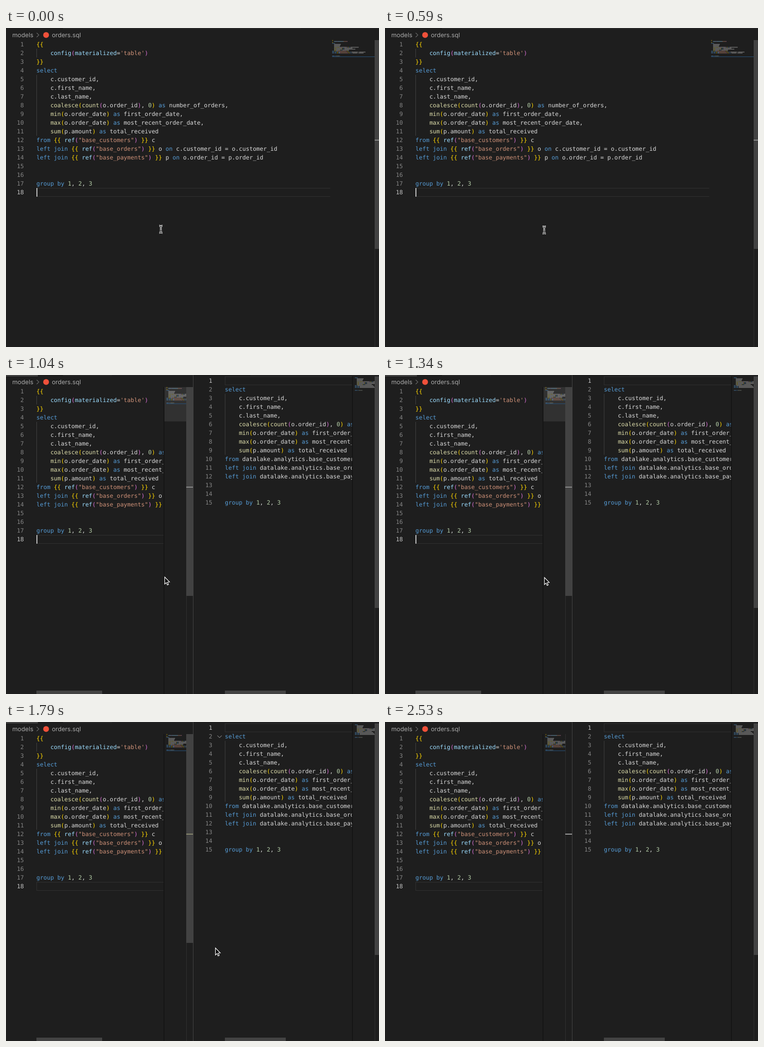
Animation of 772x660 px, one loop 2850 ms. Source, as an HTML page with a canvas:

```html
<!DOCTYPE html>
<html lang="en">
<head>
<meta charset="utf-8">
<title>SQL editor preview</title>
<style>
  html, body { margin: 0; width: 100%; height: 100%; overflow: hidden; background: #1e1e1e; }
  canvas { display: block; }
</style>
</head>
<body>
<canvas id="stage" width="772" height="660"></canvas>
<script>
const ctx = document.getElementById('stage').getContext('2d');
const LOOP = 2850, LINE = 18, CHAR = 7.224;
const MONO = '12px "DejaVu Sans Mono", monospace';
const SANS = '12.7px Inter, sans-serif';
const TEXT = '#dadada', GOLD = '#ffd700', ORCHID = '#da70d6';

const columns = `    c.customer_id,
    c.first_name,
    c.last_name,
    coalesce(count(o.order_id), 0) as number_of_orders,
    min(o.order_date) as first_order_date,
    max(o.order_date) as most_recent_order_date,
    sum(p.amount) as total_received`;

const modelSql = `{{
    config(materialized='table')
}}
select
${columns}
from {{ ref("base_customers") }} c
left join {{ ref("base_orders") }} o on c.customer_id = o.customer_id
left join {{ ref("base_payments") }} p on o.order_id = p.order_id


group by 1, 2, 3
`;

const compiledSql = `
select
${columns}
from datalake.analytics.base_customers
left join datalake.analytics.base_orders o on c.customer_id = o.customer_id
left join datalake.analytics.base_payments p on o.order_id = p.order_id


group by 1, 2, 3`;

const RULES = [
  [/^('[^']*'|"[^"]*")/, '#ce9178'],
  [/^(select|as|from|left join|on|group by)\b/, '#569cd6'],
  [/^(coalesce|count|min|max|sum)(?=\()/, '#dcdcaa'],
  [/^(config|ref|materialized)\b/, '#9cdcfe'],
  [/^\d+/, '#b5cea8'],
  [/^(\{\{|\()/, 'open'],
  [/^(\}\}|\))/, 'close'],
  [/^(\w+| +|.)/, TEXT]
];

function tokenize(source) {
  let depth = 0;
  const bracket = level => level % 2 ? ORCHID : GOLD;
  return source.split('\n').map(line => {
    const tokens = [];
    for (let col = 0; col < line.length;) {
      const rest = line.slice(col);
      let [pattern, color] = RULES.find(rule => rule[0].test(rest));
      const text = rest.match(pattern)[0];
      if (color === 'open') color = bracket(depth++);
      else if (color === 'close') color = bracket(--depth);
      tokens.push({ text, col, color });
      col += text.length;
    }
    return tokens;
  });
}

const model = tokenize(modelSql), compiled = tokenize(compiledSql);

// start time, caret in the left pane, pointer x and y
const STEPS = [
  [0, 1, 320.5, 416.5], [140, 0, 327.5, 417.5], [290, 0, 329.5, 418], [590, 1, 329.5, 418],
  [890, 0, 328.5, 417], [1040, 1, 328.5, 418], [1340, 1, 330, 419], [1490, 0, 341.5, 430.5],
  [1640, 0, 404.5, 457.5], [1790, 0, 433.5, 467.5], [1940, 1, 552, 538], [2090, 1, 552, 538],
  [2240, 1, 659, 632], [2380, 1, null, null], [2530, 0, null, null]
];

function rect(x, y, w, h, color, alpha = 1) {
  ctx.globalAlpha = alpha;
  ctx.fillStyle = color;
  ctx.fillRect(x, y, w, h);
  ctx.globalAlpha = 1;
}

function label(text, x, y, color, font = MONO) {
  ctx.font = font;
  ctx.fillStyle = color;
  ctx.fillText(text, x, y);
}

function polyline(points, color, width) {
  ctx.beginPath();
  points.forEach(([x, y]) => ctx.lineTo(x, y));
  ctx.strokeStyle = color;
  ctx.lineWidth = width;
  ctx.stroke();
}

function clipped(x, right, draw) {
  ctx.save();
  ctx.beginPath();
  ctx.rect(x, 0, right - x, 660);
  ctx.clip();
  draw();
  ctx.restore();
}

function drawPane({ lines, x, y, right, mapX, mapRight, active, caret, plain }) {
  const activeY = y + (active - 1) * LINE;
  clipped(x, right, () => {
    ctx.strokeStyle = '#303030';
    ctx.lineWidth = 1;
    ctx.strokeRect(x + .5, activeY + .5, 900, LINE - 1);
    lines.forEach((tokens, row) => {
      if (tokens[0]?.text === '    ') rect(x, y + row * LINE, 1, LINE, '#404040');
      for (const { text, col, color } of tokens)
        label(text, x + col * CHAR, y + row * LINE + 13, plain ? TEXT : color);
    });
    if (caret) rect(x, activeY, 2, LINE, '#c4c4c4');
  });
  ctx.textAlign = 'right';
  lines.forEach((_, row) =>
    label(row + 1, x - 26, y + row * LINE + 13, row + 1 === active ? '#c6c6c6' : '#858585'));
  ctx.textAlign = 'left';
  clipped(mapX, mapRight, () => lines.forEach((tokens, row) => {
    for (const { text, col, color } of tokens)
      [...text].forEach((char, i) => {
        if (char !== ' ') rect(mapX + col + i, y + row * 2, 1, 1.5, plain ? TEXT : color, .42);
      });
  }));
}

function drawBreadcrumb() {
  label('models', 13, 19, '#a9a9a9', SANS);
  polyline([[63.5, 10], [68, 14.5], [63.5, 19]], '#a0a0a0', 1);
  ctx.beginPath();
  ctx.arc(83, 14.5, 6, 0, Math.PI * 2);
  ctx.fillStyle = '#f0513a';
  ctx.fill();
  label('orders.sql', 95, 19, '#a9a9a9', SANS);
}

function drawBeam(x, y) {
  for (const [color, width] of [['#fff', 3.2], ['#111', 1.1]]) {
    ctx.beginPath();
    for (const side of [-1, 1]) {
      ctx.moveTo(x + side * 3.5, y - 7.3);
      ctx.quadraticCurveTo(x, y - 7.3, x, y - 4.5);
      ctx.lineTo(x, y + 4.5);
      ctx.quadraticCurveTo(x, y + 7.3, x + side * 3.5, y + 7.3);
    }
    ctx.moveTo(x - 1.8, y + 2.5);
    ctx.lineTo(x + 1.8, y + 2.5);
    ctx.strokeStyle = color;
    ctx.lineWidth = width;
    ctx.stroke();
  }
}

function drawArrow(x, y) {
  const shape = [[0, 0], [0, 14.5], [3.3, 11.4], [5.5, 16.4], [7.8, 15.4], [5.7, 10.5], [10, 10.3]];
  ctx.beginPath();
  shape.forEach(([dx, dy]) => ctx.lineTo(x + dx, y + dy));
  ctx.closePath();
  ctx.fillStyle = '#0a0a0a';
  ctx.fill();
  ctx.strokeStyle = '#fff';
  ctx.lineWidth = 1.2;
  ctx.stroke();
}

function drawSingle(caret) {
  rect(118, 0, 492, 2, '#2b2b2b');
  rect(610, 0, 162, 2, '#252526');
  drawPane({ lines: model, x: 63, y: 25, right: 671, mapX: 675, mapRight: 763, active: 18, caret });
  rect(675, 59, 88, 1, '#28527a');
  rect(763, 25, 1, 635, '#303030');
  rect(763, 25, 9, 432, '#424242');
  rect(763, 231, 9, 2, '#8c8c8c');
}

function drawSplit(t, caret) {
  const opening = t < 1040;
  const bars = opening ? .2 : 1;
  const fade = Math.max(0, Math.min(1, (2530 - t) / 590));
  const slider = opening ? .35 : t < 1640 ? 1 : t < 1790 ? .5 : 0;

  rect(118, 0, opening ? 53 : 101, 2, '#2b2b2b');
  rect(219, 0, 168, 2, '#252526');
  rect(506, 0, 266, 2, '#252526');
  if (!opening) rect(0, 0, 66, 3, '#424242', fade);

  rect(328, 25, 45, 71, '#313131', slider);
  drawPane({ lines: model, x: 63, y: 25, right: 328, mapX: 332, mapRight: 373, active: 18, caret });
  drawPane({ lines: compiled, x: 453, y: 3, right: 718, mapX: 722, mapRight: 763, active: 1,
    caret: opening, plain: opening });
  rect(332, 59, 41, 1, '#28527a');
  rect(326, 25, 2, 635, '#151515');
  rect(716, 3, 2, 657, '#151515');

  rect(373, 25, 1, 635, '#303030');
  rect(373, 25, 14, 432, '#424242', fade);
  rect(373, 231, 14, 2, t >= 2530 ? '#a0a0a0' : t >= 1790 ? '#8c8c70' : '#8c8c8c');
  rect(387, 0, 1, 660, '#444');
  rect(763, 3, 1, 657, '#303030');
  rect(763, 3, 9, 479, '#434343', bars);
  rect(63, 653, 136, 7, '#434343', opening ? bars : fade);
  rect(453, 653, 126, 7, '#434343', bars);
  if (t >= 1790 && t < 2090) polyline([[437.5, 28], [442, 32.5], [446.5, 28]], '#b0b0b0', 1);
}

function draw(now) {
  const time = now % LOOP;
  const [t, caret, x, y] = STEPS.findLast(step => step[0] <= time);
  ctx.textRendering = 'geometricPrecision';
  rect(0, 0, 772, 660, '#1e1e1e');
  const split = t >= 890;
  if (split) drawSplit(t, caret);
  else drawSingle(caret);
  drawBreadcrumb();
  if (x !== null) (split ? drawArrow : drawBeam)(x, y);
}

const start = performance.now();
function tick() {
  draw(performance.now() - start);
  requestAnimationFrame(tick);
}
tick();
</script>
</body>
</html>
```
